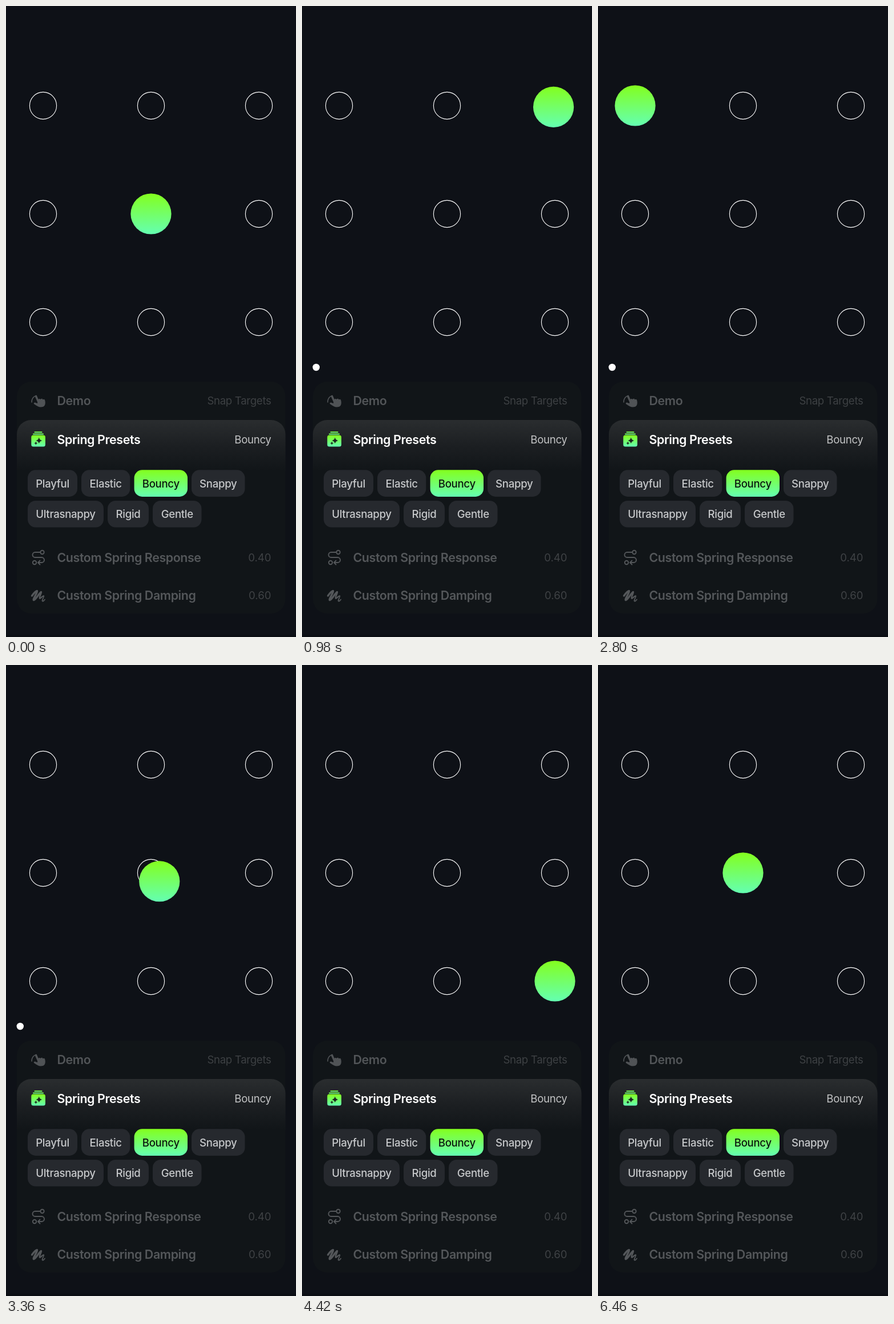
These frames come from a looping animation (508 by 1102 pixels, 7120 ms). An HTML page:

```html
<!DOCTYPE html>
<html lang="en">
<head>
<meta charset="utf-8">
<title>Spring presets</title>
<style>
  html, body { margin: 0; width: 100%; height: 100%; overflow: hidden; background: #0e1117; }
  svg { display: block; width: 100%; height: 100%; font-family: Inter, "Open Sans", sans-serif; }
  .title { font-size: 21.4px; font-weight: 600; letter-spacing: -.4px; }
  .value { font-size: 18.6px; letter-spacing: -.3px; text-anchor: end; }
  .number { letter-spacing: 0; }
  .chip { font-size: 18.6px; font-weight: 500; letter-spacing: -.3px; text-anchor: middle; }
  .line { fill: none; stroke-linecap: round; stroke-linejoin: round; }
</style>
</head>
<body>
<svg viewBox="0 0 508 1102">
  <defs>
    <linearGradient id="lime" x2="0" y2="1">
      <stop stop-color="#83ff1e"/>
      <stop offset="1" stop-color="#64ffb2"/>
    </linearGradient>
    <linearGradient id="header" x2="0" y2="1">
      <stop stop-color="#2a2d2f"/>
      <stop offset=".5" stop-color="#1c1f22"/>
      <stop offset="1" stop-color="#111518"/>
    </linearGradient>
  </defs>
  <rect width="508" height="1102" fill="#0e1117"/>
  <rect y="1098" width="508" height="4" fill="#0b0e13"/>
  <g id="rings" fill="none" stroke="#fff" stroke-width="1.1"/>
  <circle id="dot" cx="24.8" cy="631" r="6.2" fill="#fff"/>
  <circle id="ball" r="35.6" fill="url(#lime)"/>

  <rect x="19" y="656" width="470.5" height="405" rx="25" fill="#111518"/>
  <path d="M19 812V748a25 25 0 0 1 25-25H464.500a25 25 0 0 1 25 25V812Z" fill="url(#header)"/>
  <g id="rows"></g>
  <g id="chips"></g>

  <g transform="translate(57 690)" fill="#505356" stroke="#505356">
    <path class="line" stroke-width="1.6" d="M-12 2C-12-4-9-8-4-9.500"/>
    <path class="line" stroke-width="3.400" d="M-4.500-8.500L1 4"/>
    <path stroke="none" d="M-1-2C0-4 2-5 3.500-3C5-5 7-4.500 7.500-2.500C9-4 11-3 11.300-1C12.500 4 11.500 9 7.500 10C2 11.500-2 9.500-8 5C-9 3.500-7.500 2-5.500 2.700L-2 4Z"/>
  </g>
  <g fill="url(#lime)">
    <rect x="49.500" y="743.3" width="14" height="1.9" rx=".9"/>
    <rect x="47" y="746.4" width="19" height="2" rx="1"/>
    <rect x="44.300" y="749.6" width="24.600" height="19.800" rx="3.500"/>
    <path fill="#1b2420" d="M57.800 753.200Q58.500 758 63.300 758.900Q58.500 759.800 57.800 764.600Q57.100 759.800 52.300 758.900Q57.100 758 57.800 753.200ZM52.300 760.500Q52.700 763.100 55.300 763.500Q52.700 763.900 52.300 766.500Q51.900 763.900 49.300 763.500Q51.900 763.100 52.300 760.500Z"/>
  </g>
  <g class="line" stroke="#54575a" stroke-width="1.900">
    <circle cx="63.500" cy="954" r="3.200"/>
    <circle cx="50" cy="972" r="3.200"/>
    <path d="M60 954H51a4.500 4.500 0 0 0 0 9H62.500a4.500 4.500 0 0 1 0 9H56.500M59.500 968.500L56 972L59.500 975.500"/>
  </g>
  <g class="line" stroke="#54575a">
    <path stroke-width="3.400" d="M45.500 1030C49 1025 53.500 1020.500 54.500 1021.500C56 1023.500 46.500 1036 48.500 1037.500C50.500 1038.500 58 1026 61.500 1023.500"/>
    <path stroke-width="2.500" d="M61.500 1023.500C63 1024 57.500 1033 59 1034.500C60.500 1035.500 64 1029.500 66 1030.500"/>
    <path stroke-width="1.800" d="M66 1030.500C67 1031.500 62 1039 64 1039.500C65.500 1039.700 67 1038 68 1036.500"/>
  </g>
</svg>
<script>
const NS = 'http://www.w3.org/2000/svg';
const $ = id => document.getElementById(id);

function add(parent, tag, attrs, text = '') {
  const el = document.createElementNS(NS, tag);
  for (const key in attrs) el.setAttribute(key, attrs[key]);
  el.textContent = text;
  parent.append(el);
}

const COLS = [65, 254, 443], LINES = [174, 363, 552];
for (const cy of LINES) for (const cx of COLS) add($('rings'), 'circle', { cx, cy, r: 23.6 });

const rows = [
  ['Demo', 'Snap Targets', 697, '#525558', '#3d4043'],
  ['Spring Presets', 'Bouncy', 765, '#ffffff', '#c3c4c5'],
  ['Custom Spring Response', '0.40', 970.5, '#54575a', '#3f4245'],
  ['Custom Spring Damping', '0.60', 1036.5, '#54575a', '#3f4245']
];
for (const [title, value, y, ink, soft] of rows) {
  add($('rows'), 'text', { class: 'title', x: 89.5, y, fill: ink }, title);
  const kind = /\d/.test(value) ? 'value number' : 'value';
  add($('rows'), 'text', { class: kind, x: 464.5, y: y - .8, fill: soft }, value);
}

const chips = [
  ['Playful', 38, 810.3, 87], ['Elastic', 132, 810.3, 85.3],
  ['Bouncy', 224.6, 810.3, 93.4], ['Snappy', 325, 810.3, 93.5],
  ['Ultrasnappy', 38, 864, 133], ['Rigid', 178, 864, 72], ['Gentle', 257, 864, 85.5]
];
for (const [name, x, y, width] of chips) {
  const on = name === 'Bouncy';
  add($('chips'), 'rect', { x, y, width, height: 46.6, rx: 14, fill: on ? 'url(#lime)' : '#26292e' });
  add($('chips'), 'text', { class: 'chip', x: x + width / 2, y: y + 30.2, fill: on ? '#0b1510' : '#c6c8ca' }, name);
}

const LOOP = 7120, OMEGA = 2 * Math.PI / 0.4;

// Share of the distance still to travel, s seconds after release.
function remaining(s, damping) {
  if (damping >= 1) return (1 + OMEGA * s) * Math.exp(-OMEGA * s);
  const root = Math.sqrt(1 - damping * damping), phase = OMEGA * root * s;
  return Math.exp(-damping * OMEGA * s) * (Math.cos(phase) + damping / root * Math.sin(phase));
}

// kick is the sideways release speed in px/s.
const moves = [
  { at: 577, from: [254, 363], to: [443, 174], damping: 1, kick: 0 },
  { at: 2080, from: [443, 174], to: [65, 174], damping: 1, kick: 490 },
  { at: 3246, from: [65, 174], to: [443, 552], damping: 1, kick: 0 },
  { at: 5229, from: [443, 552], to: [254, 363], damping: .64, kick: 0 }
];
const dotTimes = [[580, 1640], [2080, 3240], [3260, 4420], [5200, 6400]];

function ballAt(t) {
  const move = moves.filter(m => m.at <= t).pop();
  if (!move) return [254, 363];
  const { at, from, to, damping, kick } = move;
  const s = (t - at) / 1000, left = remaining(s, damping);
  return [
    to[0] + (from[0] - to[0]) * left,
    to[1] + (from[1] - to[1]) * left + kick * s * Math.exp(-OMEGA * s)
  ];
}

function draw(t) {
  const [x, y] = ballAt(t);
  $('ball').setAttribute('cx', x.toFixed(2));
  $('ball').setAttribute('cy', y.toFixed(2));
  const lit = dotTimes.some(([on, off]) => t >= on && t < off);
  $('dot').setAttribute('visibility', lit ? 'visible' : 'hidden');
}

function tick() {
  draw(performance.now() % LOOP);
  requestAnimationFrame(tick);
}
tick();
</script>
</body>
</html>
```
